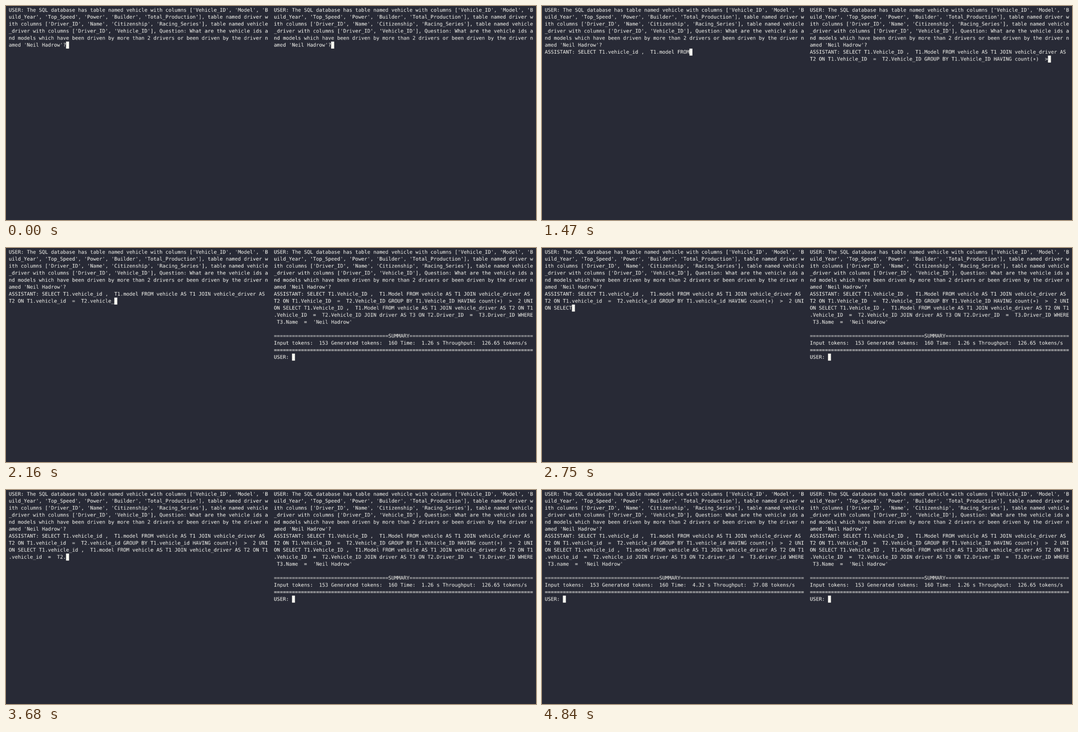
Animation, 1177 px wide and 476 px high, one loop 8000 ms. Source, as an HTML page with a canvas:

```html
<!DOCTYPE html>
<html lang="en">
<head>
<meta charset="utf-8">
<title>Two terminals</title>
<style>
  html, body { margin: 0; width: 100%; height: 100%; overflow: hidden; background: #282a36; }
  canvas { display: block; }
</style>
</head>
<body>
<canvas id="stage" width="1177" height="476"></canvas>
<script>
const WIDTH = 1177, HEIGHT = 476, SCALE = 3;
const stage = document.getElementById('stage').getContext('2d');
stage.imageSmoothingQuality = 'high';

// Glyphs are drawn large and scaled down, so that they can sit between pixels.
const large = document.createElement('canvas');
large.width = WIDTH * SCALE;
large.height = HEIGHT * SCALE;
const ctx = large.getContext('2d');
ctx.scale(SCALE, SCALE);

const BACK = '#282a36', INK = '#f8f8f2';
const COLS = 86, CELL_W = 6.69, CELL_H = 15.58, TOP = 1.22, BASELINE = 11.3;
const LOOP = 8000, ENTER = 500, FIRST_TICK = 1178.5, TICK = 49.15, LEFT_END = 4840;

const PROMPT = "USER: The SQL database has table named vehicle with columns ['Vehicle_ID', 'Model', " +
  "'Build_Year', 'Top_Speed', 'Power', 'Builder', 'Total_Production'], table named driver with " +
  "columns ['Driver_ID', 'Name', 'Citizenship', 'Racing_Series'], table named vehicle_driver with " +
  "columns ['Driver_ID', 'Vehicle_ID'], Question: What are the vehicle ids and models which have " +
  "been driven by more than 2 drivers or been driven by the driver named 'Neil Hadrow'?";

// The answer arrives in tokens, separated here by bars.
const SELECT = ' T|1|.|vehicle|_|id| ,| | T|1|.|model| FROM| vehicle| AS| T|1| JO|IN| vehicle|_|driver| AS|';
const JOIN_ON = ' T|2| ON| T|1|.|vehicle|_|id| | =| | T|2|.|vehicle|_|id|';
const QUERY = 'SELECT|' + SELECT + '|' + JOIN_ON +
  ' GROUP| BY| T|1|.|vehicle|_|id| H|AV|ING| count|(|*|)| | >| | |2| UN|ION| SELECT|' +
  SELECT + JOIN_ON +
  ' JO|IN| driver| AS| T|3| ON| T|2|.|driver|_|id| | =| | T|3|.|driver|_|id' +
  "| WHERE| T|3|.|name| | =| | '|Neil| Hadrow|'|\n";
const CAPITAL_QUERY = QUERY
  .replace(/\.\|[a-z]/g, s => s.toUpperCase())
  .replace(/_\|id/g, '_|ID');

function summary(seconds, rate) {
  return '\n' + '='.repeat(38) + 'SUMMARY' + '='.repeat(41) +
    `\nInput tokens:  153 Generated tokens:  160 Time:  ${seconds} s Throughput:  ${rate} tokens/s\n` +
    '='.repeat(COLS) + '\nUSER: ';
}

const panes = [
  { x: 6.4, tokens: QUERY.split('|'), start: 2, perTick: 2,
    done: t => t >= LEFT_END, end: summary('4.32', '37.08') },
  { x: 594.9, tokens: CAPITAL_QUERY.split('|'), start: 6, perTick: 9,
    done: t => tickAt(t) >= 16, end: summary('1.26', '126.65') }
];

// Ticks fall on whole hundredths of a second.
function tickAt(t) {
  return Math.floor((Math.floor(t / 10) * 10 + 9.999 - FIRST_TICK) / TICK);
}

function screenText(pane, t) {
  if (t < ENTER) return PROMPT;
  const tick = tickAt(t);
  const count = tick < 0 ? 0 : pane.start + pane.perTick * tick;
  const answer = pane.tokens.slice(0, count).join('');
  return PROMPT + '\nASSISTANT: ' + answer + (pane.done(t) ? pane.end : '');
}

function wrap(text) {
  return text.split('\n').flatMap(line => line.match(/.{1,86}/g) || ['']);
}

function drawGlyph(pane, row, col, char) {
  // The asterisk sits at mid-height.
  const glyph = char === '*' ? '\u2217' : char;
  ctx.fillText(glyph, pane.x + col * CELL_W, TOP + row * CELL_H + BASELINE);
}

function drawPane(pane, text) {
  const lines = wrap(text);
  ctx.fillStyle = INK;
  lines.forEach((line, row) => {
    [...line].forEach((char, col) => {
      if (char !== ' ') drawGlyph(pane, row, col, char);
    });
  });

  // At the margin the cursor waits on the last character.
  const row = lines.length - 1;
  const col = Math.min(lines[row].length, COLS - 1);
  ctx.fillRect(pane.x + col * CELL_W, TOP + row * CELL_H, CELL_W, CELL_H);
  if (lines[row][col]) {
    ctx.fillStyle = BACK;
    drawGlyph(pane, row, col, lines[row][col]);
  }
}

let shown = '';

function draw() {
  const t = performance.now() % LOOP;
  const texts = panes.map(pane => screenText(pane, t));
  const key = texts.join('|');
  if (key !== shown) {
    shown = key;
    ctx.fillStyle = BACK;
    ctx.fillRect(0, 0, WIDTH, HEIGHT);
    ctx.font = '11.11px "DejaVu Sans Mono", monospace';
    ctx.textRendering = 'geometricPrecision';
    panes.forEach((pane, i) => drawPane(pane, texts[i]));
    stage.drawImage(large, 0, 0, WIDTH, HEIGHT);
  }
  requestAnimationFrame(draw);
}
draw();
</script>
</body>
</html>
```
